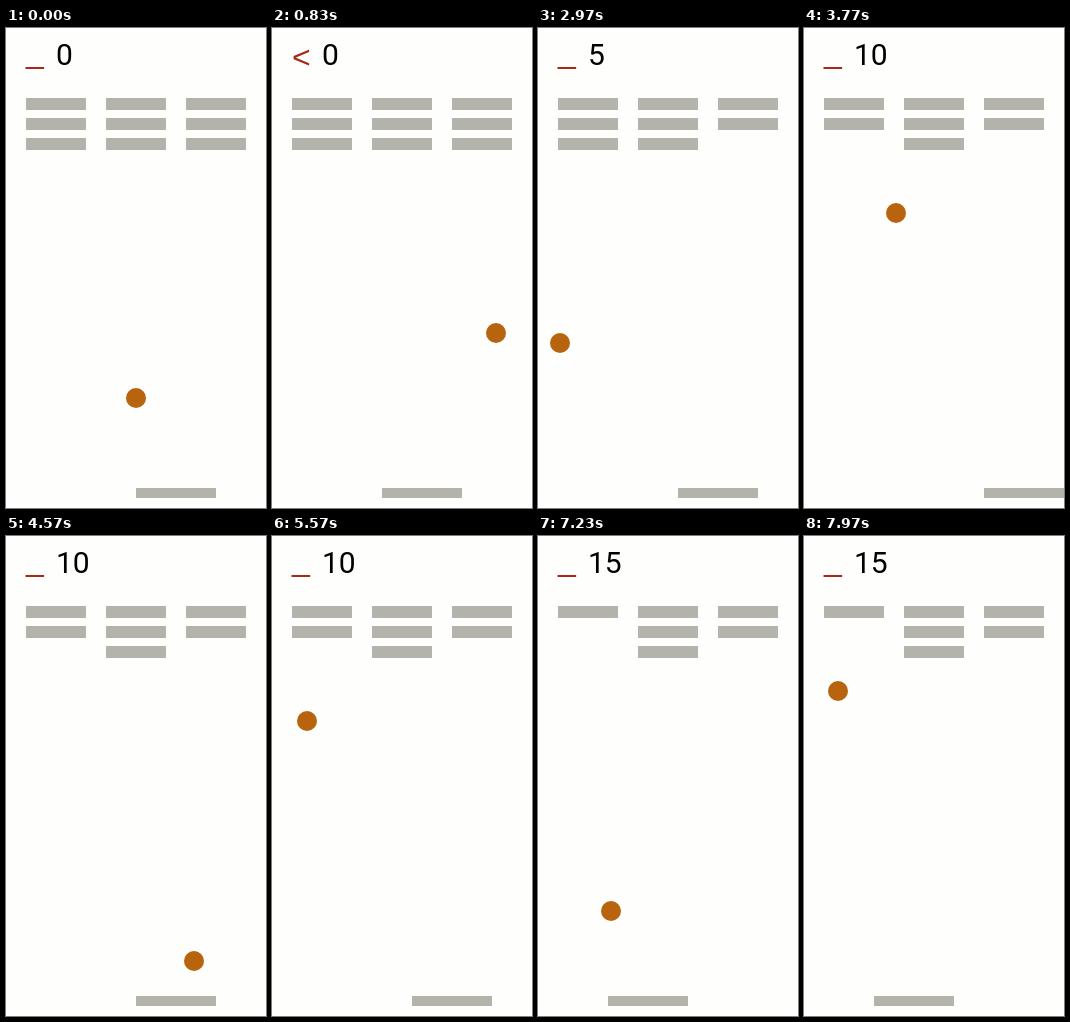
Animation, 260 px wide and 480 px high, one loop 8 s. Source, as an HTML page:

```html
<!DOCTYPE html>
<html lang="en">
<head>
<meta charset="utf-8">
<title>Brick game</title>
<style>
  html, body { margin: 0; width: 100%; height: 100%; overflow: hidden; background: #fefefc; }
  svg { display: block; width: 100%; height: 100%; }
  #key { font: 32px "Liberation Sans", Arial, sans-serif; }
  #score { font: 30px Roboto, Arial, sans-serif; }
</style>
</head>
<body>
<svg id="stage" viewBox="0 0 260 480">
  <rect width="260" height="480" fill="#fefefc"/>
  <text id="key" x="20" y="35" fill="#a52a1a">_</text>
  <text id="score" x="50" y="37" fill="#000">0</text>
  <g id="bricks" fill="#b3b3ac"></g>
  <rect id="paddle" y="460" width="80" height="10" fill="#b3b3ac"/>
  <circle id="ball" r="10" fill="#b8640f"/>
</svg>
<script>
const LOOP = 8000, STEPS = 240, R = 10;
const $ = id => document.getElementById(id);
const [key, score, paddle, ball] = ['key', 'score', 'paddle', 'ball'].map($);

// Player input: [step, paddle x], linear in between
const moves = [
  [0, 130], [11, 130], [14, 160], [20, 160], [27, 90], [34, 90], [41, 160],
  [54, 160], [66, 40], [78, 40], [88, 140], [92, 140], [94, 160], [104, 160],
  [106, 180], [121, 180], [126, 130], [146, 130], [147, 140], [168, 140],
  [173, 90], [197, 90], [199, 70], [STEPS, 70]
];

function paddleAt(step) {
  const i = moves.findIndex(m => m[0] >= step);
  if (i < 1) return moves[0][1];
  const [s0, x0] = moves[i - 1], [s1, x1] = moves[i];
  return Math.round((x0 + (x1 - x0) * (step - s0) / (s1 - s0)) / 10) * 10;
}

const bricks = [];
for (const y of [70, 90, 110]) {
  for (const x of [20, 100, 180]) {
    const el = document.createElementNS('http://www.w3.org/2000/svg', 'rect');
    const attrs = { x, y, width: 60, height: 12 };
    for (const k in attrs) el.setAttribute(k, attrs[k]);
    $('bricks').append(el);
    bricks.push({ x, y, el, gone: Infinity });
  }
}

// Two ticks per step, with a slow start
const tickOf = step => step < 3 ? step : 2 * step - 3;

function simulate() {
  const path = [];
  let x = 130, y = 370, vx = 2, vy = 5;
  for (let t = 0; t <= tickOf(STEPS); t++) {
    if (t) {
      x += vx;
      y += vy;
      if (x < R || x > 260 - R) {
        x = x < R ? R : 260 - R;
        vx = -vx;
      }
      if (vy > 0 && y >= 455) {
        const off = x - paddleAt(Math.floor((t + 3) / 2));
        vy = -5;
        vx = off < 20 ? -5 : off > 60 ? 5 : 2 * Math.sign(vx);
      }
      const hit = bricks.find(b => b.gone > t && x >= b.x && x <= b.x + 60 &&
        y - R < b.y + 12 && y + R > b.y);
      if (hit) {
        hit.gone = t;
        vy = -vy;
      }
    }
    path.push([x, y]);
  }
  return path;
}

const path = simulate();

function render(ms) {
  const step = Math.floor((Math.floor(ms / 10) + 0.35) * 0.3);
  const t = tickOf(step);
  const px = paddleAt(step);
  const dir = step ? Math.sign(px - paddleAt(step - 1)) : 0;
  key.textContent = '<_>'[dir + 1];
  key.setAttribute('y', dir ? 40 : 35);
  paddle.setAttribute('x', px);
  ball.setAttribute('cx', path[t][0]);
  ball.setAttribute('cy', path[t][1]);
  let points = 0;
  for (const b of bricks) {
    const gone = b.gone <= t;
    b.el.setAttribute('visibility', gone ? 'hidden' : 'visible');
    if (gone) points += 5;
  }
  score.textContent = points;
}

const start = performance.now();
function frame() {
  render((performance.now() - start) % LOOP);
  requestAnimationFrame(frame);
}
render(0);
requestAnimationFrame(frame);
</script>
</body>
</html>
```
